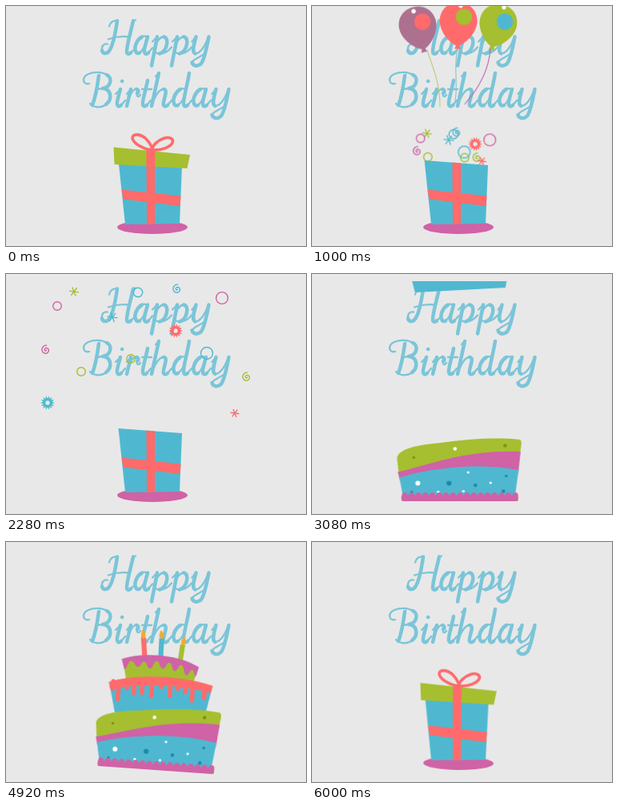
Write an HTML page that moves like this. It is 375 by 300 pixels and loops after 6040 ms.

```html
<!DOCTYPE html>
<html lang="en">
<head>
<meta charset="utf-8">
<title>Happy Birthday</title>
<style>
  html, body { margin: 0; width: 100%; height: 100%; overflow: hidden; background: #e8e8e8; }
  svg { display: block; width: 375px; height: 300px; }
  .blue { fill: #4fb8d0; } .red { fill: #ff6b6b; } .green { fill: #a5bf30; } .pink { fill: #d062a6; }
  .mauve { fill: #ae708f; } .white { fill: #fff; } .teal { fill: #1a8aa6; } .olive { fill: #7c9315; }
  .flame { fill: #f7a928; }
  .line { fill: none; stroke-linecap: round; stroke-linejoin: round; }
  #words { stroke: #7bc5d8; }
  .thick { stroke-width: 4.5; } .thin { stroke-width: 2.3; }
  #gift { transform-origin: 183px 280px; }
  #lid { transform-origin: 182px 190px; }
  #cake { transform-origin: 184px 284px; }
</style>
</head>
<body>
<svg viewBox="0 0 375 300" role="img" aria-label="Happy Birthday">
  <defs>
    <clipPath id="stage"><rect y="9" width="375" height="291"/></clipPath>
    <linearGradient id="fade" x2="0" y2="1">
      <stop offset="0" stop-color="#8fc9cf" stop-opacity=".45"/>
      <stop offset=".6" stop-color="#7cc3d2" stop-opacity=".6"/>
      <stop offset="1" stop-color="#7cc3d2" stop-opacity=".1"/>
    </linearGradient>
  </defs>

  <g id="words" class="line"></g>
  <g id="balloons"></g>
  <g id="confetti"></g>

  <g id="gift">
    <ellipse class="pink" cx="183" cy="276.5" rx="44" ry="8.5"/>
    <path class="blue" d="M140.500 193 220 199 217 272 149 273Z"/>
    <path class="red" d="M144.500 229.500 218.500 237.500 217.500 250 146.500 241.500Z"/>
    <path class="red" d="M175.500 195.500 186 196.500 186 272.500 176 273Z"/>
    <g id="lid">
      <path class="green" d="M134.500 176.500 230 186 226.500 203 135.500 198Z"/>
      <path class="red" d="M175.500 180 186.500 181 186 201 175.500 200.500Z"/>
      <g class="line" stroke="#ff6b6b" stroke-width="3.6">
        <path d="M182 180C172 179 159 172 158 165C158 159 168 160 174 165C179 170 182 175 183 179"/>
        <path d="M183 179C183 174 190 168 197 165.500C204 163 209 166 208.500 169.500C207 176 194 181 183 180"/>
      </g>
    </g>
  </g>

  <g clip-path="url(#stage)">
    <g id="streaks"></g>
    <g id="cake">
      <g id="candles"></g>
      <g id="top">
        <path class="green" d="M134 151C158 140 202 140 227 154L223 176 139 173Z"/>
        <path id="glaze" class="pink"/>
      </g>
      <g id="middle">
        <path class="blue" d="M118.500 179 247.500 176 241 210 128 216Z"/>
        <path class="red" d="M118 178C150 166 205 163 248 174L246 183C205 175 155 177 120 187Z"/>
        <path id="drips" class="line" stroke="#ff6b6b" stroke-width="5.6"/>
      </g>
      <g id="bottom">
        <path class="green" d="M105.500 230C108 218 130 214 160 211C195 206 230 204 259 207Q262 208 260.500 216L258 235 108 252Z"/>
        <path class="pink" d="M106.500 247.500C150 237 195 219 260 222L257 250 109 258Z"/>
        <path class="blue" d="M108.500 254.500C145 243 205 235 257.500 245L253 278 113 278Z"/>
        <g id="dots"></g>
        <path class="line" d="M115 276.500H254" stroke="#d062a6" stroke-width="7" stroke-dasharray="0 8.650"/>
        <rect class="pink" x="111" y="276.500" width="146" height="7.500" rx="2"/>
      </g>
    </g>
  </g>
</svg>

<script>
const LOOP = 6040;
const COLOR = { blue: '#4fb8d0', red: '#ff6b6b', green: '#a5bf30', pink: '#d062a6' };
const $ = id => document.getElementById(id);

function add(parent, tag, attrs = {}) {
  const node = document.createElementNS('http://www.w3.org/2000/svg', tag);
  for (const key in attrs) node.setAttribute(key, attrs[key]);
  return parent.appendChild(node);
}

const dot = (parent, name, cx, cy, r) => add(parent, 'circle', { class: name, cx, cy, r });

function run(node, frames) {
  const first = { ...frames[0], offset: 0, easing: 'linear' };
  const last = { ...frames[frames.length - 1], offset: 1 };
  node.animate([first, ...frames, last], { duration: LOOP, iterations: Infinity });
}

// Each step: [ms, [x, y, angle, scaleX, scaleY], easing to the next step]
function move(node, steps) {
  run(node, steps.map(([ms, [x = 0, y = 0, angle = 0, sx = 1, sy = sx], easing = 'linear']) => ({
    offset: ms / LOOP,
    transform: `translate(${x}px,${y}px) rotate(${angle}deg) scale(${sx},${sy})`,
    easing
  })));
}

function show(node, from, to) {
  run(node, [[0, 0], [from, 1], [to, 0]].map(([ms, opacity]) => ({
    offset: ms / LOOP, opacity, easing: 'steps(1)'
  })));
}

// Lettering: [thick strokes, thin strokes] around a baseline origin
const LETTERS = {
  H: ['M21-42C19-28 16-13 12-6C9 0 3 0 2-5M41-42C38-28 33-12 33-4C33 0 36 0 38-2',
      'M2-5C1-11 5-14 9-13M11-35C12-40 16-43 21-42M10-19C18-22 28-23 35-22M41-42L44-43M38-2L42-6'],
  B: ['M20-39C18-24 15-10 12-2M30-40C37-37 36-25 25-23C36-22 37-9 29-3',
      'M8-29C0-27-2-37 7-41C14-44 24-44 30-40M25-23L18-22M29-3C23 2 12 1 9-4'],
  a: ['M11-22C4-18 1-9 3-4C4-1 6-1 8-2M18-22C16-14 13-6 14-3C15 0 17 0 19-2',
      'M18-20C16-24 13-23 11-22M8-2C12-5 15-12 17-19M19-2L24-8'],
  p: ['M8-22L1 14M16-22C24-21 20-3 11-1', 'M2-16L8-22M4-6C7-15 11-22 16-22M11-1C8-1 6-2 5-4M11-1C17-1 22-4 26-9'],
  y: ['M7-22C5-14 1-3 6-1M23-22C20-8 18 6 13 12C8 16 3 14 2 10',
      'M2-16L7-22M6-1C12-1 18-10 21-18M2 10C3 6 12 4 19-2'],
  i: ['M7-22C5-14 2-6 3-3C4 0 6 0 8-2M9-32L9.200-32', 'M1-16L7-22M8-2L13-8'],
  r: ['M7-22L2-1M14-22C17-21 17-18 15-17', 'M2-16L7-22M4-9C7-17 10-23 14-22M15-17C14-12 17-12 19-15'],
  t: ['M10-33C7-18 3-7 4-3C5 0 7 0 9-2', 'M3-22H15M9-2L14-8'],
  h: ['M10-42L1-1M16-22C23-22 14-6 16-2C17 0 19 0 21-2', 'M6-38L10-42M4-9C7-16 11-22 16-22M21-2L26-8'],
  d: ['M11-22C4-18 1-9 3-4C4-1 6-1 8-2M22-42C19-24 14-8 15-3C16 0 18 0 20-2',
      'M18-20C16-24 13-23 11-22M8-2C12-5 16-12 18-19M20-2L25-8']
};

function write(text, baseline, xs) {
  [...text].forEach((char, i) => {
    const g = add($('words'), 'g', { transform: `translate(${xs[i]} ${baseline})` });
    LETTERS[char].forEach((d, n) => add(g, 'path', { class: n ? 'thin' : 'thick', d }));
  });
}
write('Happy', 60.5, [118, 159, 181, 206, 230.5]);
write('Birthday', 126, [96, 136, 149, 167, 181, 207, 232, 255.5]);

// Balloons: colour, centre, tilt, shine colour and place, glint, string
const BALLOONS = [
  ['mauve', 133, 28, -14, 'red', 138, 20, 127, 7, '#bccb7c', 'M144 56C150 75 160 95 160 126'],
  ['red', 183, 23, 2, 'green', 190, 14, 186, 0, '#8cc3c8', 'M182 54C176 78 184 98 178 125'],
  ['green', 232, 25, 14, 'blue', 241, 20, 240, 2, '#bd62b0', 'M223 54C221 82 208 104 191 123']
];
BALLOONS.forEach(([name, x, y, tilt, shine, sx, sy, gx, gy, stroke, d]) => {
  const g = add($('balloons'), 'g');
  g.style.transformOrigin = `${x}px ${y}px`;
  add(g, 'path', { class: 'line', stroke, 'stroke-width': 1.1, d });
  add(g, 'path', {
    class: name,
    transform: `translate(${x} ${y}) rotate(${tilt})`,
    d: 'M-23.500-4C-23-19-12-27 0-27S23-19 23.500-4C23 12 9 24 2 27L4 31H-4L-2 27C-9 24-23 12-23.500-4Z'
  });
  dot(g, shine, sx, sy, 10.3);
  dot(g, 'white', gx, gy, 2.7);
  const start = [182 - x, 228 - y, 0, .25];
  move(g, [[480, start, 'cubic-bezier(.3,.3,.6,.9)'], [1000, []], [1400, [0, -175]]]);
});

// Confetti
function starburst(r) {
  let d = '';
  for (let i = 0; i < 28; i++) {
    const a = i * Math.PI / 14, k = i % 2 ? r * .62 : r;
    d += (i ? 'L' : 'M') + (k * Math.cos(a)).toFixed(2) + ' ' + (k * Math.sin(a)).toFixed(2);
  }
  const h = r * .3;
  return `${d}ZM${h} 0A${h} ${h} 0 1 0 ${-h} 0A${h} ${h} 0 1 0 ${h} 0Z`;
}

function spiral(r) {
  let d = 'M0 0';
  for (let i = 1; i <= 40; i++) {
    const a = i * .28, k = r * i / 40;
    d += `L${(k * Math.cos(a)).toFixed(2)} ${(k * Math.sin(a)).toFixed(2)}`;
  }
  return d;
}

function aster(r) {
  return [0, 60, 120].map(deg => {
    const a = (deg + 8) * Math.PI / 180, x = r * Math.cos(a), y = r * Math.sin(a);
    return `M${-x} ${-y}L${x} ${y}`;
  }).join('');
}

const ring = r => `M${r} 0A${r} ${r} 0 1 0 ${-r} 0A${r} ${r} 0 1 0 ${r} 0`;

// Shape, colour, radius, place just outside the box, final place
const PIECES = [
  [aster, 'green', 6, 144, 160, 85, 22],
  [ring, 'pink', 5.3, 136, 166, 64, 40],
  [spiral, 'pink', 6, 132, 182, 50, 95],
  [ring, 'green', 5.3, 145, 189, 94, 122],
  [starburst, 'blue', 9, 160, 208, 52, 161],
  [aster, 'blue', 6.5, 171, 168, 133, 54],
  [ring, 'blue', 5.7, 177, 161, 165, 23],
  [spiral, 'blue', 6, 181, 159, 214, 19],
  [ring, 'pink', 7.4, 222, 168, 270, 30],
  [starburst, 'red', 9, 204, 173, 212, 71],
  [ring, 'green', 5.2, 191, 190, 156, 106],
  [ring, 'blue', 7.5, 190, 183, 251, 99],
  [spiral, 'green', 6, 206, 190, 301, 129],
  [aster, 'red', 5.5, 212, 194, 286, 174]
];
PIECES.forEach(([shape, color, r, x1, y1, x2, y2]) => {
  const solid = shape === starburst;
  const node = add($('confetti'), 'path', {
    d: shape(r),
    fill: solid ? COLOR[color] : 'none',
    'fill-rule': 'evenodd',
    stroke: solid ? 'none' : COLOR[color],
    'stroke-width': 1.4
  });
  const near = [x2 - (x2 - x1) * .025, y2 - (y2 - y1) * .025];
  move(node, [
    [740, [182, 235, 0, 0]],
    [780, [182, 230, 0, .5]],
    [1000, [x1, y1], 'cubic-bezier(.2,.6,.4,1)'],
    [1640, near],
    [2280, [x2, y2]],
    [2320, [x2, y2], 'ease-in'],
    [2560, [x2, y2, 0, 0]]
  ]);
});

// Gift
move($('gift'), [
  [0, []], [80, [0, 0, -.4]], [160, []],
  [2320, [], 'ease-in'], [2560, [0, 0, 0, 0]],
  [5590, [0, 0, 0, 0], 'ease-out'],
  [5720, [0, 0, 13, .98], 'ease-in-out'],
  [5820, [0, 0, -4, 1, 1.02], 'ease-in-out'],
  [5910, [0, 0, 2], 'ease-in-out'],
  [6000, [0, 0, .5]], [6040, []]
]);
move($('lid'), [
  [380, []], [520, [0, -70, -5]], [760, [0, -225, 4]],
  [5500, [0, -225, 4], 'steps(1)'], [5501, []]
]);

// Icing: a wavy lower edge on the top tier, round drips on the middle one
function wave(points) {
  return points.slice(1).map(([x, y], i) => {
    const [px, py] = points[i], mid = (px + x) / 2;
    return `C${mid} ${py} ${mid} ${y} ${x} ${y}`;
  }).join('');
}
$('glaze').setAttribute('d', 'M132 148.500C158 137.500 202 137.500 229 152L226 164' + wave([
  [226, 164], [221, 156], [214, 163], [207, 151], [199, 159], [192, 149], [184, 157],
  [176, 148], [168, 158], [160, 150], [153, 157], [144, 150], [136, 161]
]) + 'Z');
$('drips').setAttribute('d', [
  [123.5, 186], [130.5, 199], [141, 184], [150, 190], [160, 189], [172, 192], [184, 180],
  [195, 190], [205, 181], [214, 184], [223, 194], [238, 190]
].map(([x, y]) => `M${x} 177V${y}`).join(''));

[['white', 131.5, 261.5, 3], ['white', 178, 218.5, 2.2], ['olive', 126.5, 229.5, 1.7],
 ['olive', 240.5, 214.5, 2.2], ['teal', 170.5, 261.5, 3.1], ['teal', 203.5, 264, 2.2],
 ['teal', 242, 252.5, 1.7], ['teal', 238.5, 271.5, 2.2], ['white', 194.5, 248, 1.6],
 ['white', 222.5, 261, 1.6], ['teal', 124, 272.5, 1.6], ['white', 157, 272.5, 1.7],
 ['white', 188.5, 271.5, 1.6]].forEach(args => dot($('dots'), ...args));

function drop(node, start, height) {
  move(node, [
    [start - 40, [0, -310], 'steps(1)'],
    [start - 1, [0, -height - 40], 'steps(1)'],
    [start, [0, -height], 'ease-in'],
    [start + 110, []],
    [5500, [], 'steps(1)'], [5501, [0, -310]]
  ]);
}
drop($('bottom'), 2800, 200);
drop($('middle'), 3080, 193);
drop($('top'), 3280, 150);

// Candles: colour, base centre, tilt, length, streak start
[['red', 160.5, 145, -7, 25, 3540], ['blue', 180.5, 144, -1, 25, 3700], ['green', 205, 147, 5, 22, 3860]]
  .forEach(([name, x, y, tilt, size, start]) => {
    const streak = add($('streaks'), 'rect', { x: x - 4, y: 10, width: 5.5, height: 86, fill: 'url(#fade)' });
    show(streak, start, start + 50);

    const g = add($('candles'), 'g');
    const body = add(g, 'g', { transform: `translate(${x} ${y}) rotate(${tilt})` });
    add(body, 'rect', { class: name, x: -3.1, y: -size, width: 6.2, height: size + 3 });
    const wick = add(body, 'g', { transform: `translate(0 ${1 - size})` });
    const flame = add(wick, 'path', { class: 'flame', d: 'M0 0C-4-1-3.500-6-.500-11C3-7 4-1 0 0Z' });

    move(g, [
      [start + 39, [0, -210], 'steps(1)'],
      [start + 40, [0, -60], 'ease-in'],
      [start + 90, [0, 2]], [start + 140, []],
      [5500, [], 'steps(1)'], [5501, [0, -210]]
    ]);
    const flicker = [];
    for (let ms = start + 240, n = 0; ms < 5440; ms += 120, n++) {
      flicker.push([ms, [0, 0, n % 2 ? 5 : -5, 1, n % 3 ? 1 : 1.12], 'ease-in-out']);
    }
    move(flame, [[start + 110, [0, 0, -8, 0], 'ease-out'], ...flicker]);
  });

// Whole cake: squash on each landing, sway, then tip away to the right
const squash = ms => [[ms, []], [ms + 50, [0, 0, 0, 1.014, .982]], [ms + 120, [0, 0, 0, .996, 1.006]], [ms + 170, []]];
move($('cake'), [
  ...squash(2910).slice(0, 3), [3080, [.7, 0]],
  ...squash(3190), ...squash(3390),
  [3640, []], [3720, []],
  [3800, [0, 0, 0, 1.008, .99]], [3880, []],
  [3960, [0, 0, 0, 1.008, .99]], [4060, []],
  [4300, [], 'ease-in-out'], [4500, [0, 0, -.7], 'ease-in-out'],
  [4700, [0, 0, -.3], 'ease-in'],
  [4840, [1, 0, 1.7]],
  [4920, [3, 1, 4], 'cubic-bezier(.45,.05,.8,.6)'],
  [5440, [290, 20, 16]],
  [5560, [290, 20, 16], 'steps(1)'], [5561, []]
]);
</script>
</body>
</html>
```
